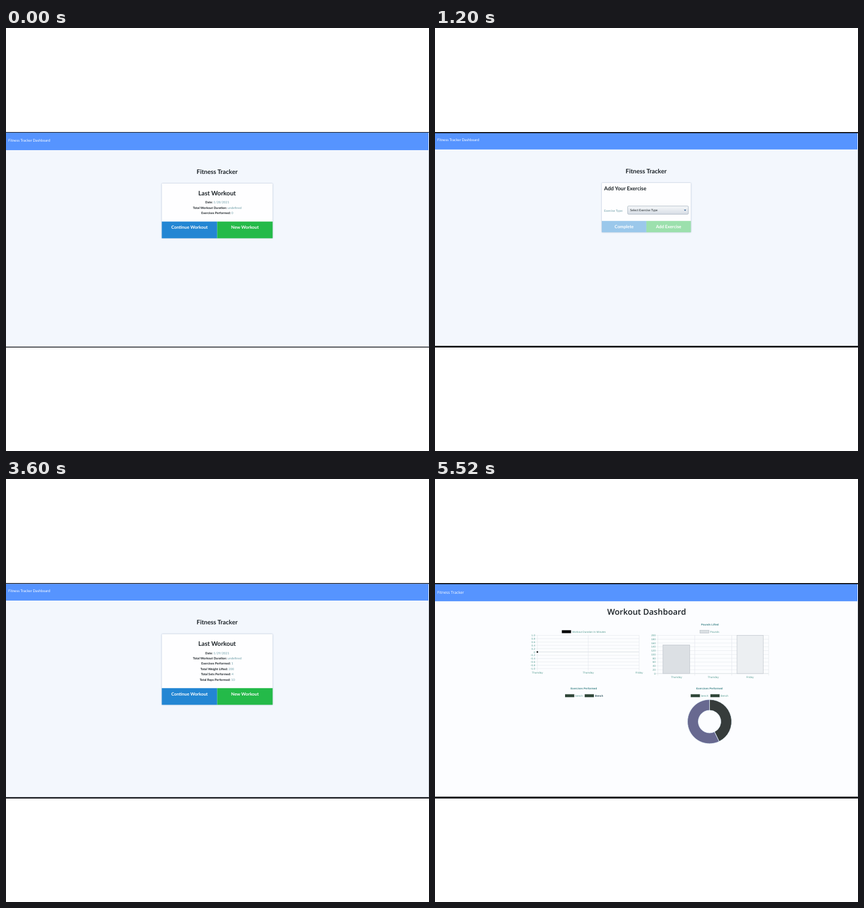
Write an HTML page that moves like this. It is 748x748 px and loops after 6 s.

```html
<!DOCTYPE html>
<html lang="en">
<head>
<meta charset="utf-8">
<title>Workout log</title>
<style>
html, body { margin: 0; width: 100%; height: 100%; overflow: hidden; background: #fff; }
svg { display: block; width: 748px; height: 748px; }
text { font-family: Lato, sans-serif; text-rendering: geometricPrecision; white-space: pre; }
.chart text { font-family: "Liberation Sans", Arial, sans-serif; font-size: 4.7px; }
.shadow { filter: drop-shadow(0 .5px 1px #9fb0c8); }
</style>
</head>
<body>
<svg id="stage" viewBox="0 0 748 748"></svg>
<script>
const INK = '#1b2227', SOFT = '#6a9ba5', BLUE = '#2386d3', GREEN = '#24ba49', TICK = '#559c91';
const DEFS = `<defs><linearGradient id="field" x2="0" y2="1">
  <stop stop-color="#f6f8fa"/><stop offset="1" stop-color="#d7dde5"/></linearGradient></defs>`;

const rect = (x, y, w, h, fill, more = '') =>
  `<rect x="${x}" y="${y}" width="${w}" height="${h}" fill="${fill}" ${more}/>`;
const text = (x, y, s, size, fill = INK, more = '') =>
  `<text x="${x}" y="${y}" font-size="${size}" fill="${fill}" ${more}>${s}</text>`;
const line = (x1, y1, x2, y2, color = '#e3e7eb') =>
  `<path d="M${x1} ${y1}L${x2} ${y2}" stroke="${color}" stroke-width=".7"/>`;
const BOLD = 'font-weight="700"', MID = 'text-anchor="middle"', END = 'text-anchor="end"';
const HEAD = `${BOLD} ${MID}`;

// Browser window: top and bottom edges, page background and blue bar
function frame(top, navEnd, bottom, bg, label) {
  return rect(0, 184, 748, 381, '#0b0d12') +
    rect(0, top, 748, bottom - top, bg) +
    rect(0, top, 747, navEnd - top, '#5694ff') +
    rect(747, navEnd, 1, bottom - navEnd, '#ccd2da') + label;
}

const appFrame = (top, navEnd, bottom, y) =>
  frame(top, navEnd, bottom, '#f3f7fd', text(4, y, 'Fitness Tracker Dashboard', 6.45, '#fff')) +
  text(373.3, y + 56.8, 'Fitness Tracker', 10.9, INK, HEAD);

// White card with two buttons under it
function card(x, y, w, split, h, labels, textY, dim) {
  const half = w / 2;
  const alpha = dim ? 'opacity=".45"' : '';
  const label = (i) => text(x + half * (i + .5), textY, labels[i], 7.8, '#fff', HEAD);
  return `<g class="shadow">${rect(x, y, w, split - y + h, '#fefeff', 'rx="1.2"')}</g>` +
    rect(x, split, half, h, BLUE, alpha) + rect(x + half, split, half, h, GREEN, alpha) +
    label(0) + label(1);
}

function summary(y, split, rows) {
  return card(275.5, y, 196, split, 29.5, ['Continue Workout', 'New Workout'], split + 13.1) +
    text(373.3, y + 21, 'Last Workout', 11, INK, HEAD) +
    rows.map(([name, value], i) => text(373.5, y + 35.3 + i * 9.4,
      `<tspan ${BOLD}>${name}:</tspan> <tspan fill="${SOFT}">${value}</tspan>`, 5.55, INK, MID)).join('');
}

function field(y, label, value, h = 14.5) {
  const focus = h > 15;
  const names = label.split('|');
  return names.map((s, i) => text(299, y + 9.7 + i * 7.4 - (focus ? .6 : 0), s, 5.4, SOFT)).join('') +
    rect(340.7, y, 107.3, h, 'url(#field)',
      `rx="1.5" stroke="${focus ? '#1e2a2c' : '#99a7b5'}" stroke-width="${focus ? 1.3 : .7}"`) +
    text(345, y + h / 2 + 1.9, value, 5.5);
}

const arrow = '<path d="M440.2 321.2h4l-2 2.4z" fill="#27568a"/>';

function form(y, split, fields, dim) {
  return card(295, y, 157.5, split, 20, ['Complete', 'Add Exercise'], split + 13, dim) +
    text(299, y + 13.2, 'Add Your Exercise', 9.4, INK, BOLD) + fields + arrow;
}

// Grid with value labels on the left
function grid(x, y, w, h, values, columns) {
  const step = h / (values.length - 1);
  return values.map((v, i) => line(x - 3.5, y + i * step, x + w, y + i * step, +v ? '#e6eaed' : '#c9d0d5') +
      text(x - 4, y + i * step + 1.7, v, 4.7, TICK, END)).join('') +
    columns.map(cx => line(cx, y, cx, y + h + 3.5)).join('');
}

const days = (xs, y) => ['Thursday', 'Thursday', 'Friday']
  .map((d, i) => text(xs[i], y, d, 4.7, TICK, MID)).join('');
const key = (x, y, fill, label, more) =>
  rect(x, y, 16.3, 5.2, fill, more) + text(x + 18.3, y + 4.2, label, 4.7, TICK);
const chartTitle = (x, y, s) => text(x, y, s, 4.7, '#3e8488', HEAD);

function ring(cx, cy, R, r, from, to, fill) {
  const at = (a, q) => `${cx + q * Math.sin(a)} ${cy - q * Math.cos(a)}`;
  const big = to - from > Math.PI ? 1 : 0;
  return `<path d="M${at(from, R)}A${R} ${R} 0 ${big} 1 ${at(to, R)}L${at(to, r)}` +
    `A${r} ${r} 0 ${big} 0 ${at(from, r)}Z" fill="${fill}" stroke="#e4f1fa" stroke-width=".9"/>`;
}

function charts() {
  const tenths = Array.from({ length: 11 }, (_, i) => i === 5 ? '0' : (1 - i * .2).toFixed(1));
  const pounds = Array.from({ length: 11 }, (_, i) => String(200 - i * 20));
  const edge = 'stroke="#b3bac1" stroke-width=".6"';
  const dark = '#2f4638';
  const split = Math.PI * 2 * 150 / 350;
  return '<g class="chart">' +
    key(224.3, 267.4, '#050607', 'Workout Duration In Minutes') +
    grid(181, 276.5, 180, 58.7, tenths, [181, 271, 361]) + days([181, 271, 361], 343.5) +
    '<circle cx="181" cy="305.9" r="1.4" fill="#050607"/>' +
    chartTitle(486, 258.8, 'Pounds Lifted') + key(468.3, 267.4, '#dadfe3', 'Pounds', edge) +
    grid(394, 276.5, 196, 67.5, pounds, [394, 459.3, 524.7, 590]) +
    rect(403, 293.3, 47.6, 50.7, '#dce0e4', edge) +
    rect(534, 276.5, 46.4, 67.5, '#eceff2', edge) + days([427, 492, 557], 352) +
    chartTitle(263, 371.8, 'Exercises Performed') + chartTitle(485.3, 371.8, 'Exercises Performed') +
    key(230, 380.6, dark, 'bench') + key(264.7, 380.6, dark, `<tspan fill="#2f5560" ${BOLD}>Bench</tspan>`) +
    key(452.2, 380.6, dark, 'bench') + key(487, 380.6, dark, 'Bench') +
    ring(485.5, 429, 39, 20, 0, split, '#363c3b') +
    ring(485.5, 429, 39, 20, split, Math.PI * 2, '#686990') + '</g>';
}

const scenes = [
  appFrame(185, 216, 563.6, 201.2) + summary(275, 342.3, [
    ['Date', '1/28/2021'], ['Total Workout Duration', 'undefined'], ['Exercises Performed', 0]]),
  appFrame(186, 214.8, 562, 200.1) +
    form(274, 341.2, field(314.8, 'Exercise Type:', 'Select Exercise Type'), true),
  appFrame(185, 215.3, 563.6, 200.6) + form(274.3, 487,
    field(315, 'Exercise Type:', 'Resistance') + field(349.5, 'Exercise Name:', 'Bench') +
    field(376.2, 'Weight (lbs):', '200') + field(403, 'Sets:', '4') + field(429.7, 'Reps:', '10') +
    field(456.7, 'Duration|(minutes):', '10', 18) + line(351.4, 462.8, 351.4, 468.7, INK) +
    '<path d="M439.4 464.9l1.4-1.8 1.4 1.8zm0 1.8l1.4 1.8 1.4-1.8z" fill="#33444c"/>'),
  appFrame(185.5, 215, 562.6, 200.4) + summary(274.3, 369.8, [
    ['Date', '1/29/2021'], ['Total Workout Duration', 'undefined'], ['Exercises Performed', 1],
    ['Total Weight Lifted', 200], ['Total Sets Performed', 4], ['Total Reps Performed', 10]]),
  frame(186, 216.2, 561.7, '#fcfdff',
    text(4, 202.8, 'Fitness Tracker', 6.85, '#fff', 'style="font-family:Open Sans,sans-serif"')) +
    text(374.2, 239.5, 'Workout Dashboard', 14.4, INK,
      `${MID} font-weight="600" style="font-family:Open Sans,sans-serif"`) + charts()
];

const stage = document.getElementById('stage');
let shown = -1;
function draw() {
  const i = Math.floor(performance.now() % 6000 / 1200);
  if (i !== shown) stage.innerHTML = DEFS + scenes[shown = i];
  requestAnimationFrame(draw);
}
draw();
</script>
</body>
</html>
```
